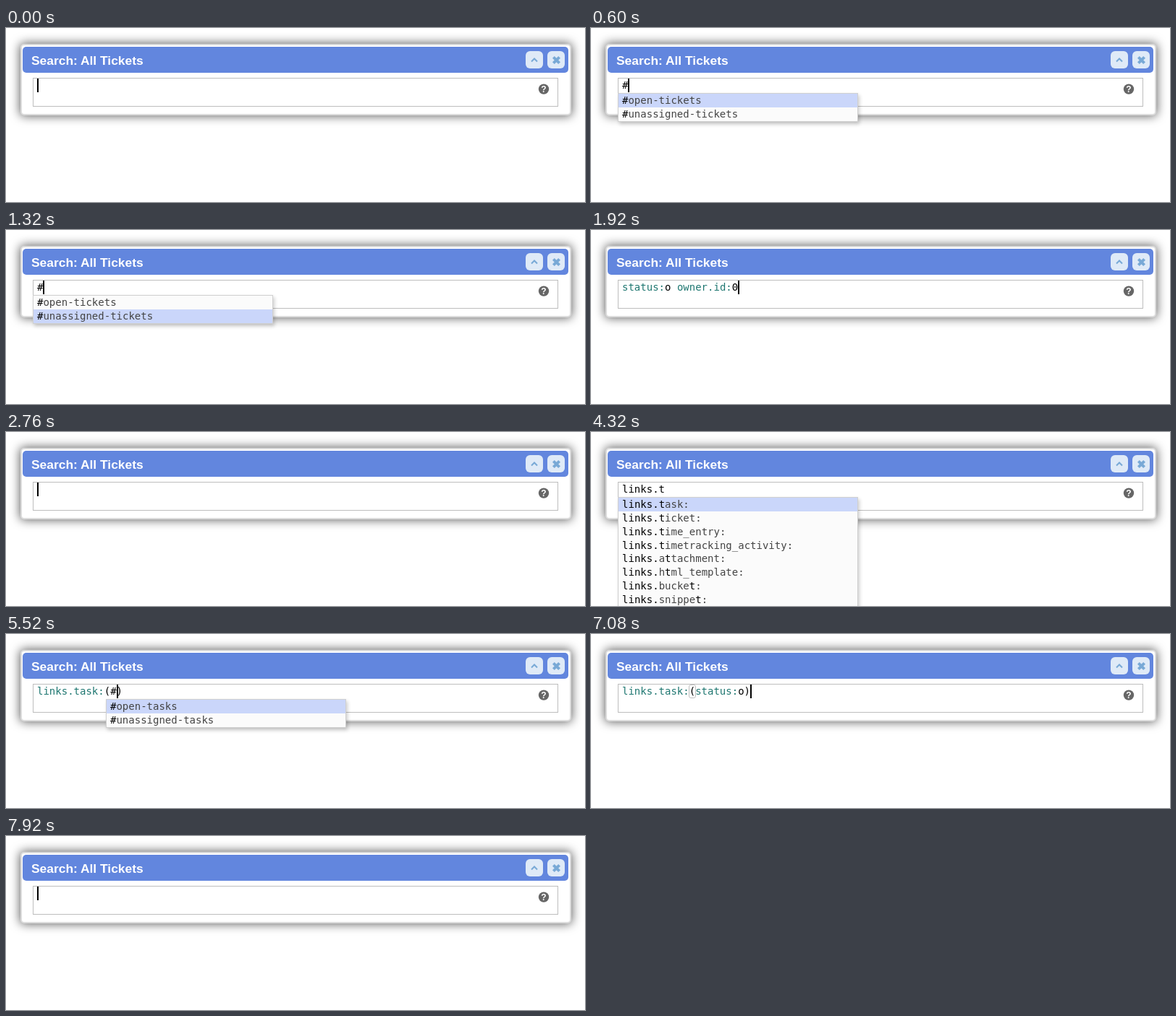
These frames come from a looping animation (800x241 px, 8000 ms). An HTML page:

```html
<!DOCTYPE html>
<html lang="en">
<head>
<meta charset="utf-8">
<title>Search</title>
<style>
  html, body { margin: 0; width: 100%; height: 100%; overflow: hidden; background: #fff; }
  body { position: relative; }
  div, svg { position: absolute; box-sizing: border-box; }
  #dialog { left: 20px; top: 22px; width: 761px; height: 99px; border: 2px solid #dcdcdc;
    border-radius: 5px; background: #fff; box-shadow: 0 0 14px 1px rgba(0, 0, 0, .62); }
  #head { left: 23px; top: 26px; width: 754px; height: 36px; border-radius: 5px; background: #6286de; }
  #title { left: 35px; top: 35px; color: #fff; font: bold 17.4px/20px "Liberation Sans", Arial, sans-serif; white-space: pre; }
  #field { left: 37px; top: 69px; width: 726px; height: 40px; border: 1px solid #bdbdbd; }
  #line, #menu { font: 14px/18.86px "DejaVu Sans Mono", monospace; white-space: pre; }
  #line { left: 43px; top: 70px; color: #000; }
  #line b { font-weight: normal; color: #1f7771; }
  #caret { top: 70px; width: 2px; height: 19px; background: #000; }
  #match { top: 70px; width: 10px; height: 19px; border: 1px solid #c0c0c0; border-radius: 3px; }
  #menu { top: 90px; width: 332px; border: 1px solid #d0d0d0; background: #fbfbfb; color: #444;
    box-shadow: 2px 3px 5px rgba(0, 0, 0, .2); }
  #menu p { margin: 0; padding-left: 5px; height: 18.86px; }
  #menu p.on { background: #cad6fa; }
  #menu b { font-weight: normal; color: #000; }
</style>
</head>
<body>
<div id="dialog"></div>
<div id="head"></div>
<div id="title">Search: All Tickets</div>
<div id="field"></div>
<svg width="800" height="241" style="left:0;top:0" fill="none">
  <g fill="#dfeaf7">
    <rect x="718" y="32" width="24" height="24" rx="6"/>
    <rect x="748" y="32" width="24" height="24" rx="6"/>
  </g>
  <path d="M726 46.5l4-4 4 4" stroke="#78a9d6" stroke-width="2"/>
  <path d="M756.4 40.4l8.2 8.2m0-8.2l-8.2 8.2" stroke="#78a9d6" stroke-width="4"/>
  <circle cx="743" cy="84.6" r="7.2" fill="#666"/>
  <text x="743" y="88.8" fill="#fff" text-anchor="middle" font-family="Liberation Sans, Arial, sans-serif" font-weight="bold" font-size="12">?</text>
</svg>
<div id="match"></div>
<div id="line"></div>
<div id="caret"></div>
<div id="menu"></div>
<script>
const LOOP = 8000, BLINK = 480, LEFT = 43, CHAR = 8.428;
const $ = id => document.getElementById(id);
const links = names => names.split(' ').map(n => `links.${n}:`);

const menus = {
  tickets: ['#open-tickets', '#unassigned-tickets'],
  links: links('address asset attachment bucket calendar comment contact custom_record domain'),
  linksT: links('task ticket time_entry timetracking_activity attachment html_template bucket snippet portal'),
  fields: 'closed: comments: completed: created: due: fieldset: id: importance: links:'.split(' '),
  tasks: ['#open-tasks', '#unassigned-tasks']
};

// time, text, caret column (end of text by default)
const edits = [[0, ''], [240, '#'], [1680, 'status:o owner.id:0']];
['status:o owner.id:', 'status:o owner', 'status:o o', 'status:', 'stat', '']
  .forEach((s, i) => edits.push([2160 + i * 120, s]));
[...'links.t'].forEach((c, i) => edits.push([3000 + i * 120, 'links.t'.slice(0, i + 1)]));
edits.push(
  [4560, 'links.task:()', 12], [5160, 'links.task:(#)', 13],
  [6360, 'links.task:(status:o)', 20], [6840, 'links.task:(status:o)'],
  [7680, 'links.task:('], [7800, 'links.'], [7920, '']);

// time, menu, selected row, column of its left edge
const opens = [
  [0], [360, 'tickets', 0, 0], [960, 'tickets', 1, 0], [1680],
  [3120, 'links', 0, 0], [3720, 'linksT', 0, 0],
  [4560, 'fields', 0, 12], [5280, 'tasks', 0, 12], [6360]
];

const at = (track, t) => track.findLast(step => step[0] <= t);

// Marks the typed characters, taken in order
function markHits(item, typed) {
  let k = 0;
  return [...item].map(c => c === typed[k] ? (k++, `<b>${c}</b>`) : c).join('');
}

function setHtml(el, html) {
  if (el.shown !== html) el.innerHTML = el.shown = html;
}

function draw() {
  const t = performance.now() % LOOP;
  const [since, text, col = text.length] = at(edits, t);
  setHtml($('line'), text.replace(/[\w.]+:/g, '<b>$&</b>'));

  $('caret').style.left = LEFT + col * CHAR + 'px';
  $('caret').hidden = Math.floor((t - since) / BLINK) % 2 === 1;

  const pair = { '(': text.indexOf(')'), ')': text.indexOf('(') }[text[col - 1]] ?? -1;
  $('match').hidden = pair < 0;
  $('match').style.left = LEFT - 1 + pair * CHAR + 'px';

  const [, name, row, edge] = at(opens, t);
  $('menu').hidden = !name;
  if (name) {
    const typed = text.slice(edge, col);
    $('menu').style.left = Math.round(LEFT - 6 + edge * CHAR) + 'px';
    setHtml($('menu'), menus[name].map((item, i) =>
      `<p${i === row ? ' class="on"' : ''}>${markHits(item, typed)}</p>`).join(''));
  }
  requestAnimationFrame(draw);
}
draw();
</script>
</body>
</html>
```
